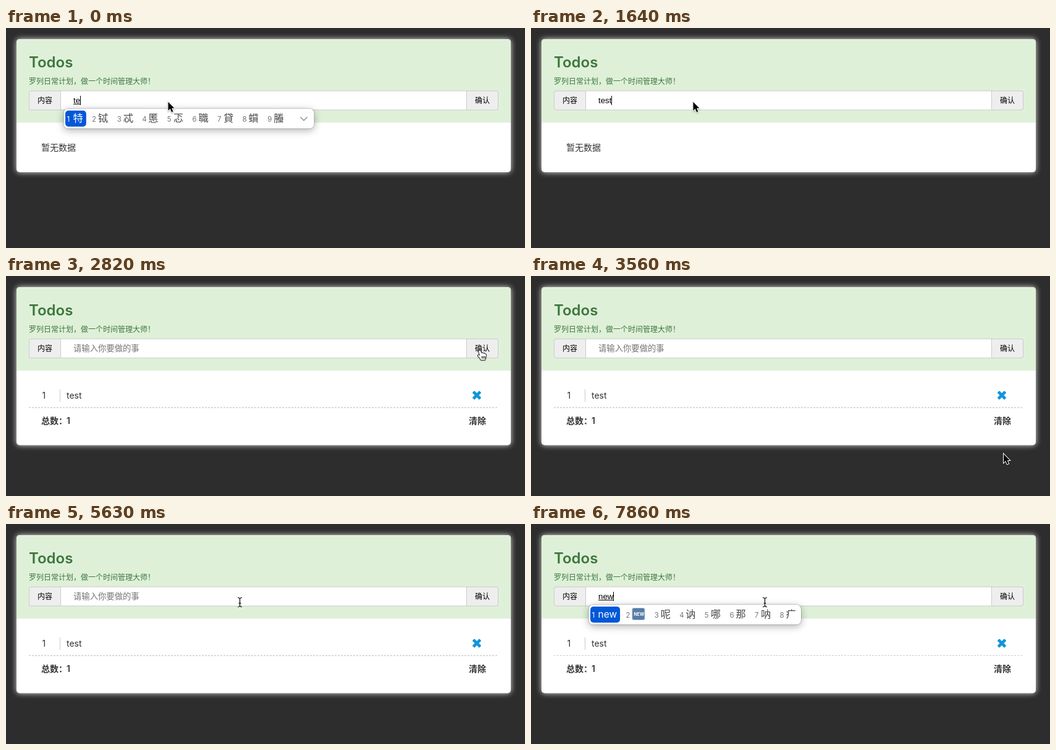
An HTML page with a canvas that plays this animation: 840x357 px, repeating every 8 s.

```html
<!DOCTYPE html>
<html lang="zh-CN">
<head>
<meta charset="utf-8">
<title>Todos</title>
<style>
html, body { margin: 0; width: 840px; height: 357px; overflow: hidden; background: #2d2d2d; }
canvas { display: block; }
</style>
</head>
<body>
<canvas id="stage" width="840" height="357"></canvas>
<script>
const ctx = document.getElementById('stage').getContext('2d');
const LOOP = 8000;
const UI = 'Inter, "Noto Sans CJK SC", "Noto Sans CJK", sans-serif';
const FIELD = '"Liberation Sans", "Noto Sans CJK SC", "Noto Sans CJK", sans-serif';

// [start, value, composing]
const typed = [
  [0, 'te', true], [450, 'tes', true], [600, 'test', true], [1640, 'test', false],
  [2820, '', false], [6380, 'n', true], [6820, 'ne', true], [6970, 'new', true]
];
const caret = [
  [0, true], [1340, false], [1640, true], [2090, false], [5190, true],
  [5630, false], [6080, true], [7420, false], [7860, true]
];
// [start, candidates, right edge, has chevron]
const popups = [
  [0, '特 铽 忒 慝 忑 職 貸 蟘 螣', 498.5, true],
  [450, '特色 特殊 特使 特首 特设 特赦', 498.5, true],
  [900, 'test 兰沃姆尼 特殊 特色 特使 特首', 498.5, true],
  [1640, '', 0, false],
  [6820, '呢 讷 哪 那 呐 疒 訥 抐 眲', 498.5, true],
  [6970, 'new NEW 呢 讷 哪 那 呐 疒', 437, false]
];
// [start, x, y, shape]
const pointer = [
  [0, 262.5, 120, arrow], [2090, 300, 122, beam], [2240, 520, 126, beam],
  [2390, 730, 127, beam], [2530, 771, 127, hand], [2820, 770, 128, hand],
  [2970, 769, 142, arrow], [3120, 767, 172, arrow], [3270, 766, 203, arrow],
  [3560, 765, 289, arrow], [3710, 560, 286, arrow], [3860, 343, 278, arrow],
  [4160, 356, 210, arrow], [4300, 375, 150, arrow], [4450, 381.5, 125, arrow],
  [4600, 374, 112, beam], [4750, 356, 105, beam], [4900, 342, 113, beam],
  [5040, 334, 120, beam], [5330, 378.5, 127, beam]
];

function at(list, t) {
  let hit = list[0];
  for (const item of list) if (item[0] <= t) hit = item;
  return hit;
}

function text(str, x, y, size, color, weight = 400, family = UI) {
  ctx.font = `${weight} ${size}px ${family}`;
  ctx.fillStyle = color;
  ctx.fillText(str, x, y);
  return ctx.measureText(str).width;
}

function rect(x, y, w, h, color) {
  ctx.fillStyle = color;
  ctx.fillRect(x, y, w, h);
}

function rounded(x, y, w, h, r, fill) {
  ctx.beginPath();
  ctx.roundRect(x, y, w, h, r);
  ctx.fillStyle = fill;
  ctx.fill();
}

function shadow(color, blur, dy = 0) {
  ctx.shadowColor = color;
  ctx.shadowBlur = blur;
  ctx.shadowOffsetY = dy;
}

function poly(points) {
  ctx.beginPath();
  points.forEach(([x, y]) => ctx.lineTo(x, y));
  ctx.closePath();
}

function drawCard(full) {
  const bottom = full ? 274.5 : 234;
  ctx.save();
  shadow('rgba(255,255,255,.85)', 10);
  rounded(17, 18, 800, bottom - 18, 5, '#fff');
  ctx.restore();
  rounded(17, 18, 800, 135.5, [5, 5, 0, 0], '#dff0d8');
  text('Todos', 37, 64, 24, '#3c763d', 600);
  text('罗列日常计划，做一个时间管理大师！', 37, 90.5, 12, '#3c763d');

  rounded(37, 101.5, 760, 32, 4, '#ccc');
  rounded(38, 102.5, 758, 30, 3, '#eee');
  rect(88, 102, 658, 31, '#ccc');
  rect(89, 102.5, 656, 30, '#fff');
  text('内容', 51, 121.5, 12, '#000', 500);
  text('确认', 759, 121.5, 12, '#000', 500);
}

function drawList() {
  text('1', 58.5, 198.5, 14, '#333');
  rect(87, 184, 1, 20, '#ccc');
  text('test', 98, 198.5, 14, '#333');

  ctx.save();
  ctx.strokeStyle = '#ccc';
  ctx.setLineDash([3, 2]);
  ctx.beginPath();
  ctx.moveTo(37, 213.5);
  ctx.lineTo(797, 213.5);
  ctx.stroke();
  ctx.restore();

  ctx.save();
  ctx.translate(762, 193.5);
  ctx.rotate(Math.PI / 4);
  rounded(-8, -2.4, 16, 4.8, 1, '#1296db');
  rounded(-2.4, -8, 4.8, 16, 1, '#1296db');
  ctx.restore();

  text('总数：', 57, 239.5, 14, '#333', 700);
  text('1', 98, 239.5, 14, '#333', 600);
  text('清除', 749, 239.5, 14, '#333', 700);
}

function drawField(t) {
  const [, value, composing] = at(typed, t);
  let width = 0;
  if (value) width = text(value, 109, 122, 13.333, '#000', 400, FIELD);
  else text('请输入你要做的事', 109, 122, 13.333, '#757575', 400, FIELD);
  if (composing) rect(109, 123, Math.round(width), 1, '#000');
  if (at(caret, t)[1] && (value || t >= 5190)) {
    rect(109 + Math.floor(width), 110, 1, 15, '#000');
  }
}

function drawPopup(t) {
  const [, words, right, chevron] = at(popups, t);
  if (!words) return;
  ctx.save();
  shadow('rgba(0,0,0,.32)', 13, 3);
  rounded(93.5, 131, right - 93.5, 32, 7, '#fff');
  ctx.restore();
  ctx.strokeStyle = 'rgba(0,0,0,.16)';
  ctx.lineWidth = 1;
  ctx.beginPath();
  ctx.roundRect(93, 130.5, right - 92.5, 33, 7.5);
  ctx.stroke();

  let x = 98.5;
  words.split(' ').forEach((word, i) => {
    const size = /[a-z]/.test(word) ? 15.5 : 16.3;
    const badge = word === 'NEW';
    ctx.font = `400 ${size}px ${UI}`;
    const width = badge ? 22 : ctx.measureText(word).width;
    if (!i) rounded(96, 134, width + 17.5, 26, 5, '#0058d8');
    text(i + 1, x, 151.5, 11.5, i ? '#777' : '#fff');
    if (badge) drawBadge(x + 10);
    else text(word, x + 10, 152.3, size, i ? '#484848' : '#fff');
    x += width + 24.3;
  });

  if (chevron) {
    ctx.strokeStyle = '#888';
    ctx.lineWidth = 1.3;
    ctx.beginPath();
    ctx.moveTo(476.5, 144.5);
    ctx.lineTo(482, 150);
    ctx.lineTo(487.5, 144.5);
    ctx.stroke();
  }
}

function drawBadge(x) {
  rounded(x, 136, 21, 20, 3, '#a3b4c6');
  rounded(x + 1, 137, 19, 18, 2, '#557ca8');
  text('NEW', x + 3, 149, 7, '#fff', 700);
}

function arrow() {
  poly([[0, 0], [0, 14], [3.2, 11], [5.6, 16.4], [8, 15.4], [5.7, 10.2], [9.8, 10]]);
  ctx.save();
  shadow('rgba(0,0,0,.35)', 2, 1);
  ctx.strokeStyle = '#fff';
  ctx.lineWidth = 2;
  ctx.stroke();
  ctx.restore();
  ctx.fillStyle = '#000';
  ctx.fill();
}

function beam() {
  ctx.beginPath();
  for (const s of [-1, 1]) {
    ctx.moveTo(-3.5, 7.5 * s);
    ctx.quadraticCurveTo(0, 7.5 * s, 0, 5 * s);
    ctx.quadraticCurveTo(0, 7.5 * s, 3.5, 7.5 * s);
  }
  ctx.moveTo(0, -6);
  ctx.lineTo(0, 6);
  ctx.moveTo(-2, 1.5);
  ctx.lineTo(2, 1.5);
  for (const [color, width] of [['#fff', 2.6], ['#000', 1.2]]) {
    ctx.strokeStyle = color;
    ctx.lineWidth = width;
    ctx.stroke();
  }
}

function hand() {
  poly([[-4.5, -7], [-3, -7.5], [-2, -6.5], [-.3, -2.5], [1, -3.3], [2.4, -2.2], [3.7, -2.8],
    [5, -1.6], [6.2, -1.5], [7, 0], [6.5, 4], [5, 8], [-1.5, 8], [-3, 5], [-6, 2], [-6, .5],
    [-4.5, .2], [-2.8, 1.4], [-5.2, -5.5]]);
  ctx.save();
  shadow('rgba(0,0,0,.3)', 2, 1);
  ctx.lineWidth = 1.6;
  ctx.lineJoin = 'round';
  ctx.strokeStyle = '#000';
  ctx.stroke();
  ctx.restore();
  ctx.fillStyle = '#fff';
  ctx.fill();
  for (const x of [.5, 2.7, 4.9]) rect(x - .5, 2, 1, 4, '#000');
}

function draw(now) {
  const t = now % LOOP;
  const full = t >= 2820;
  rect(0, 0, 840, 357, '#2d2d2d');
  drawCard(full);
  if (full) drawList();
  else text('暂无数据', 57, 198.5, 14, '#333');
  drawField(t);
  drawPopup(t);

  const [, x, y, shape] = at(pointer, t);
  ctx.save();
  ctx.translate(x, y);
  shape();
  ctx.restore();
  requestAnimationFrame(draw);
}
requestAnimationFrame(draw);
</script>
</body>
</html>
```
